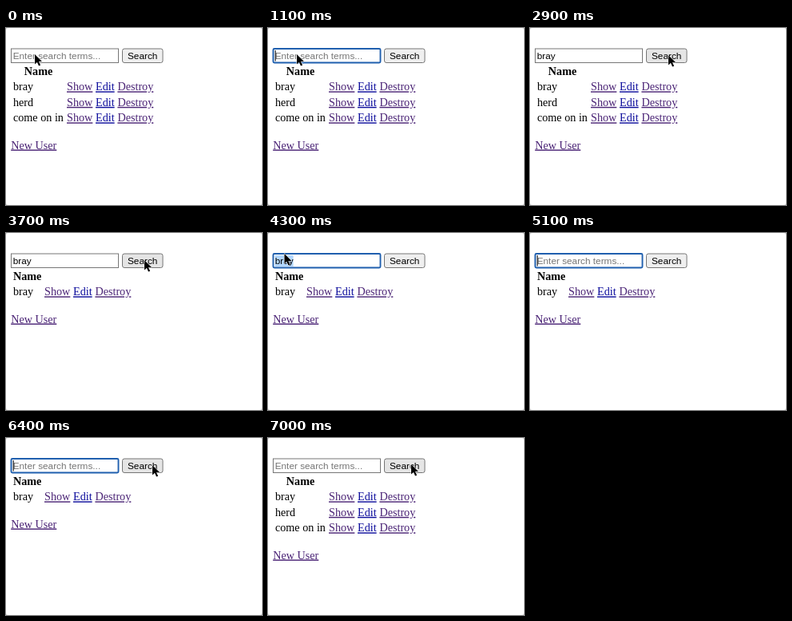
Write an HTML page that moves like this. It is 320 px wide and 222 px high and loops after 7300 ms.

```html
<!DOCTYPE html>
<html lang="en">
<head>
<meta charset="utf-8">
<title>User search</title>
<style>
  html, body { margin: 0; width: 100%; height: 100%; overflow: hidden; background: #d4d4d4; }
  svg { display: block; width: 320px; height: 222px; }
  text { font: 14.2px "Liberation Serif", Times, serif; white-space: pre; }
  .head { font-weight: bold; }
  .link { fill: #4b2476; text-decoration: underline; }
  .edit { fill: #0c0c9c; }
  .form text { font: 11.8px "Liberation Sans", Arial, sans-serif; }
  .form #hint { fill: #757575; }
  #field { fill: #fff; }
  #button { stroke: #767676; stroke-width: 1; }
</style>
</head>
<body>
<svg viewBox="0 0 320 222">
  <rect width="320" height="222" rx="3" fill="#fff"/>
  <g class="form">
    <rect id="field" x="6.5" y="26" width="134" height="17.5"/>
    <rect id="selection" x="8.7" y="28" height="14" fill="#b3d7ff"/>
    <text id="hint" x="8.7" y="38.9">Enter search terms...</text>
    <text id="value" x="8.7" y="38.9"></text>
    <rect id="caret" y="28" width="1" height="13.5"/>
    <rect id="button" x="145.5" y="26" width="50.5" height="17.5" rx="2.5"/>
    <text x="152" y="38.9">Search</text>
  </g>
  <g id="all"></g>
  <g id="found"></g>
  <path id="mouse" d="M0 0V12.4L2.9 9.7L5 14.6L7.1 13.7L5 8.9H9Z" stroke="#fff" stroke-width="1" paint-order="stroke"/>
</svg>
<script>
const LOOP = 7300, STEP = 100, TERM = 'bray';
const $ = id => document.getElementById(id);

// Static tables: one with every user, one with the match only
function label(x, y, text, cls = '') {
  return `<text x="${x}" y="${y}" class="${cls}">${text}</text>`;
}
function table(names, headX, linkX) {
  const rows = names.map((name, i) => {
    const y = 78.4 + i * 19.5;
    return label(8.9, y, name) +
      label(linkX, y, 'Show', 'link') +
      label(linkX + 36, y, 'Edit', 'link edit') +
      label(linkX + 63.4, y, 'Destroy', 'link');
  });
  return label(headX, 59, 'Name', 'head') + rows.join('') +
    label(6.2, 93 + names.length * 19.5, 'New User', 'link');
}
$('all').innerHTML = table([TERM, 'herd', 'come on in'], 22.8, 76);
$('found').innerHTML = table([TERM], 8.9, 48);

// Pointer stops: [time, x, y]; each trip is visible from its first stop until `end`
const trips = [
  { end: 1200, stops: [[0, 36, 33]] },
  { end: 4600, stops: [[2200, 44, 33], [2300, 96, 31], [2400, 147, 33], [2500, 164, 33],
    [2700, 173, 34], [3700, 173, 34], [3900, 122, 33], [4100, 46, 32], [4200, 36, 32],
    [4400, 5, 20], [4500, 0, 16]] },
  { end: LOOP, stops: [[5600, 30, 30], [5800, 104, 33], [6000, 176, 36], [6100, 191, 35],
    [6300, 183, 34], [6400, 183, 34], [6500, 179, 33]] }
];

function pointer(t) {
  const trip = trips.find(({ stops, end }) => t >= stops[0][0] && t < end);
  if (!trip) return null;
  const next = trip.stops.findIndex(s => s[0] > t);
  if (next < 0) return trip.stops.at(-1).slice(1);
  const [t0, x0, y0] = trip.stops[next - 1], [t1, x1, y1] = trip.stops[next];
  const k = (t - t0) / (t1 - t0);
  return [x0 + (x1 - x0) * k, y0 + (y1 - y0) * k];
}

const during = (t, ...spans) => spans.some(([a, b]) => t >= a && t < b);
const show = (id, on) => { $(id).style.display = on ? '' : 'none'; };
const set = (id, attrs) => {
  for (const name in attrs) $(id).setAttribute(name, attrs[name]);
};

function draw(t) {
  const typed = t < 5000 ? TERM.slice(0, Math.max(0, (t - 1100) / 100)) : '';
  $('value').textContent = typed;
  show('hint', !typed);
  const width = typed ? $('value').getComputedTextLength() : 0;

  const focused = during(t, [400, 2800], [4100, 6500]);
  set('field', focused
    ? { stroke: '#1f5fae', 'stroke-width': 1.9, rx: 1.5 }
    : { stroke: '#767676', 'stroke-width': 1, rx: 0 });
  show('caret', during(t, [500, 2000], [2400, 2800], [4100, 4300], [5000, 5600], [6100, 6500]));
  set('caret', { x: 8.7 + width });
  show('selection', during(t, [4300, 5000]));
  set('selection', { width });

  const filtered = during(t, [3000, 6700]);
  show('found', filtered);
  show('all', !filtered);

  const at = pointer(t);
  const hover = at && at[0] >= 145 && at[0] <= 196;
  const pressed = during(t, [2800, 2900], [6500, 6600]);
  set('button', { fill: pressed ? '#f5f5f5' : hover ? '#e5e5e5' : '#efefef' });
  show('mouse', at);
  if (at) set('mouse', { transform: `translate(${at})` });
}

const start = performance.now();
function tick() {
  const t = (performance.now() - start) % LOOP;
  draw(Math.floor(t / STEP) * STEP);
  requestAnimationFrame(tick);
}
tick();
</script>
</body>
</html>
```
